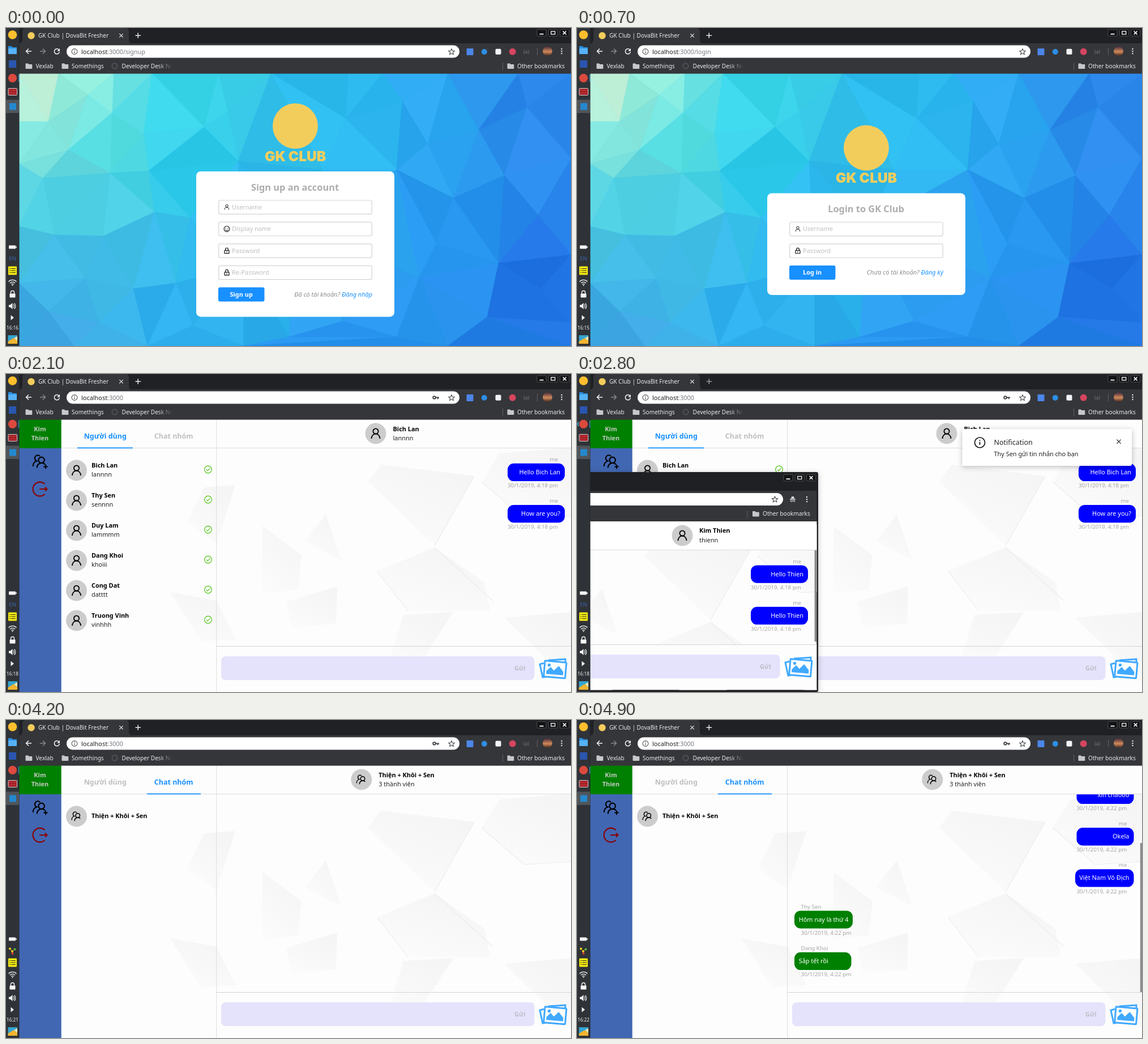
An HTML page that plays this animation: 998x561 px, repeating every 5600 ms.

```html
<!DOCTYPE html>
<html lang="vi">
<head>
<meta charset="utf-8">
<title>GK Club</title>
<style>
html, body { margin: 0; width: 100%; height: 100%; overflow: hidden; background: #202124; }
svg { display: block; width: 998px; height: 561px; font-family: "Noto Sans", "Open Sans", sans-serif; white-space: pre; }
.b { font-weight: 700; }
.i { font-style: italic; }
.m { text-anchor: middle; }
.e { text-anchor: end; }
.logo { font-family: Inter, sans-serif; font-weight: 900; }
.pop { filter: drop-shadow(0 2px 5px rgba(0,0,0,.25)); }
</style>
</head>
<body>
<svg id="stage" viewBox="0 0 998 561" xmlns="http://www.w3.org/2000/svg"></svg>
<script>
const STEP = 700, BODY = 10.92, UI = 10.15, SMALL = 9.82, HEAD = 12.48;
const BLUE = '#1890ff', BAR = '#35363a';

// Basic shapes; text takes its vertical centre
const text = (x, y, s, fill = '#000', cls = '', size = BODY) =>
  `<text x="${x}" y="${y + size * .36}" fill="${fill}" class="${cls}" font-size="${size}">${s}</text>`;
const rect = (x, y, w, h, fill, r = 0, more = '') =>
  `<rect x="${x}" y="${y}" width="${w}" height="${h}" rx="${r}" fill="${fill}" ${more}/>`;
const circle = (x, y, r, fill, more = '') => `<circle cx="${x}" cy="${y}" r="${r}" fill="${fill}" ${more}/>`;
const line = (d, stroke, w = 1, more = '') =>
  `<path d="${d}" fill="none" stroke="${stroke}" stroke-width="${w}" ${more}/>`;
const shape = (d, fill) => `<path d="${d}" fill="${fill}"/>`;
const at = (x, y, body, k = 1) => `<g transform="translate(${x} ${y}) scale(${k})">${body}</g>`;
const clip = (id, body) => `<g clip-path="url(#${id})">${body}</g>`;
const cross = (x, y, r, c, w = 1.2) => line(`M${x - r} ${y - r}l${2 * r} ${2 * r}m0 ${-2 * r}l${-2 * r} ${2 * r}`, c, w);

// Icons
const user = (x, y, k = 1) => at(x, y, line('M-7.5 9a7.5 8.5 0 0 1 15 0', '#000', 1.8) +
  circle(0, -4, 4.6, 'none', 'stroke="#000" stroke-width="1.8"'), k);
const users = (x, y, k = 1, plus = '') => at(x, y,
  line('M-11 8.5a8 8 0 0 1 6-9a5 5 0 1 1 5.500-8M-4.500 11a7.700 8 0 0 1 13.500-5.500', '#000', 2) +
  circle(3, -2, 5, 'none', 'stroke="#000" stroke-width="2"') + plus, k);
const lock = (x, y, k = 1, c = '#111') => at(x, y,
  rect(-4, -.5, 8, 5.3, 'none', .6, `stroke="${c}" stroke-width="1.2"`) +
  line('M-2.400 -.5v-2a2.400 2.400 0 0 1 4.800 0v2M0 1.200v2', c, 1.2), k);
const smile = (x, y) => at(x, y, circle(0, 0, 4.9, 'none', 'stroke="#111" stroke-width="1.1"') +
  circle(-1.9, -1.2, .7, '#111') + circle(1.9, -1.2, .7, '#111') + line('M-2.300 1a2.300 2 0 0 0 4.600 0', '#111', 1));
const folder = (x, y, c = '#c6c8ca') => shape(`M${x} ${y + 1}q0-1 1-1h3.500l1.300 1.500h5q1 0 1 1v6q0 1-1 1h-9.800q-1 0-1-1z`, c);
const star = (x, y) => line(`M${x} ${y - 5}l1.500 3.400 3.700.3-2.800 2.500.9 3.700-3.300-2-3.300 2 .9-3.700-2.800-2.500 3.700-.3z`, '#44474a', 1.1);
const dots = (x, y) => [-4, 0, 4].map(d => circle(x, y + d, 1.2, '#e8eaed')).join('');
const tick = y => circle(357, y, 6.3, '#fff', 'stroke="#52c41a" stroke-width="1.2"') + line(`M354 ${y}l2.300 2.300 4-4.600`, '#52c41a', 1.2);
const photos = (x, y) => at(x, y,
  line('M-16 -9l-7 2 5 23 5-1M-8 -14l30-2 0 5', '#40a9ff', 3) +
  `<g transform="rotate(5)">` + rect(-15, -12, 38, 28, '#fdfdfd', 1, 'stroke="#40a9ff" stroke-width="3"') +
  shape('M-11 11v-5l7-8 6 6 8-9 9 10v6z', '#40a9ff') + circle(-7, -5, 2.7, '#40a9ff') + '</g>');
const buttons = (x, y) => [0, 20.3, 40.6].map((d, i) => at(x + d, y,
  rect(-8, -5.7, 16, 11.4, '#111214', 1, 'stroke="#4c4f52"') +
  [line('M-3.500 2.200h7', '#fff', 1.8), rect(-3.5, -2.5, 7, 5, 'none', 0, 'stroke="#fff" stroke-width="1.3"'), cross(0, 0, 2.9, '#fff', 1.5)][i])).join('');

// Low-poly backdrop: Delaunay mesh over a few points, tinted from nearby swatches
const mesh = [23,80, 93,80, 190,80, 258,80, 375,80, 468,80, 605,80, 665,80, 780,80, 905,80, 998,80,
  23,165, 75,165, 145,118, 187,150, 243,187, 350,175, 392,148, 600,160, 700,130, 745,205, 835,180, 920,140,
  23,240, 65,265, 110,215, 184,256, 252,252, 325,335, 410,235, 560,250, 690,250, 790,300, 880,260, 998,230,
  23,350, 85,365, 172,367, 262,325, 510,350, 420,420, 760,380, 940,330, 998,400, 870,415, 730,440,
  23,450, 75,500, 140,442, 225,460, 165,520, 300,450, 945,460, 850,510, 998,520,
  23,561, 120,561, 250,561, 330,525, 420,561, 500,545, 595,517, 690,545, 780,561, 998,561];
const swatches = [[35, 95, 'd2f7dc'], [120, 110, '94eedd'], [60, 200, '82e6df'], [190, 200, '54dee2'], [90, 310, '4dcfe2'],
  [310, 130, '38d4e8'], [320, 250, '2dcbec'], [130, 440, '3fb9e6'], [420, 380, '2bb7ee'], [90, 530, '40a9e6'], [300, 510, '2daeee'],
  [600, 160, '2dbdf0'], [750, 150, '2ba6f0'], [930, 130, '2b86ea'], [760, 380, '2797f0'], [600, 535, '2793ee'], [940, 440, '2173e4']];
function tint(x, y, n) {
  let sum = 0, c = [0, 0, 0];
  for (const [sx, sy, hex] of swatches) {
    const w = 1 / (1 + Math.hypot(x - sx, y - sy)) ** 3;
    sum += w;
    c = c.map((v, k) => v + w * parseInt(hex.substr(k * 2, 2), 16));
  }
  const shift = (n * 37 % 11 - 5) * 1.3;
  return `rgb(${c.map(v => Math.round(Math.min(255, v / sum + shift)))})`;
}
function backdrop() {
  const p = [];
  for (let k = 0; k < mesh.length; k += 2) p.push([mesh[k], mesh[k + 1]]);
  let out = rect(23, 80, 975, 481, '#2badee'), n = 0;
  for (let i = 0; i < p.length; i++) for (let j = i + 1; j < p.length; j++) for (let k = j + 1; k < p.length; k++) {
    const [a, b] = p[i], [c, d] = p[j], [e, f] = p[k];
    const area = 2 * (a * (d - f) + c * (f - b) + e * (b - d));
    if (Math.abs(area) < 1) continue;
    const A = a * a + b * b, C = c * c + d * d, E = e * e + f * f;
    const x = (A * (d - f) + C * (f - b) + E * (b - d)) / area;
    const y = (A * (e - c) + C * (a - e) + E * (c - a)) / area;
    const r = Math.hypot(a - x, b - y) - 1e-6;
    if (p.some(q => Math.hypot(q[0] - x, q[1] - y) < r)) continue;
    const col = tint((a + c + e) / 3, (b + d + f) / 3, n++);
    out += `<path d="M${a} ${b}L${c} ${d}L${e} ${f}z" fill="${col}" stroke="${col}" stroke-width=".7"/>`;
  }
  return out;
}

const facets = ['M640 190L662 160 827 180 757 303z', 'M840 190L872 140 998 130V250L915 255z', 'M655 348L757 306 845 368 855 418H710z',
  'M453 268L522 320 515 380 452 388z', 'M528 295L565 248 592 328z', 'M495 402L585 375 583 440 505 448z',
  'M350 200L405 196 372 300 320 262z', 'M702 425L790 420 735 505 672 525z', 'M880 430L998 420V545z', 'M290 385L372 400 405 468 345 472z']
  .map(d => `<path d="${d}" fill="url(#facet)"/>`).join('') +
  line('M655 348L710 418M757 303L827 180M840 190L915 255L998 250M757 306L860 400', '#ececec', 1.2);

// Sign-up and login forms
const rows = { Username: (x, y) => user(x, y, .5), 'Display name': smile, Password: lock, 'Re-Password': lock };
function form(top, title, names, label, ask, link) {
  const y = i => top + 63 + 38.45 * i, end = y(names.length);
  return '<use href="#poly"/>' + circle(511, top - 80, 40, '#f3cd5c') +
    text(511, top - 27, 'GK CLUB', '#f3cd5c', 'logo m', 24.5) +
    rect(336, top, 350, end - top + 39.6, '#fff', 8) +
    text(510.5, top + 28, title, '#adadad', 'b m', 16.38) +
    names.map((s, i) => rect(375.7, y(i) - 12, 270.6, 24.3, '#fff', 3, 'stroke="#d4d4d4" stroke-width="1.2"') +
      rows[s](390, y(i)) + text(399, y(i), s, '#bfbfbf')).join('') +
    rect(375, end - 12.4, 81.5, 25, BLUE, 3) + text(415.7, end, label, '#fff', 'b m') +
    text(647, end, `${ask} <tspan fill="${BLUE}">${link}</tspan>`, '#8c8c8c', 'i e');
}

// Chat page
const people = [['Bich Lan', 'lannnn'], ['Thy Sen', 'sennnn'], ['Duy Lam', 'lammmm'], ['Dang Khoi', 'khoiii'], ['Cong Dat', 'datttt'], ['Truong Vinh', 'vinhhh']];
const group = 'Thiện + Khôi + Sen';
const avatar = (x, y, icon = user) => circle(x, y, 18.5, '#ccc') + icon(x, y, icon === users ? .75 : 1);

function side(tab) {
  const [u, g] = tab ? ['#bfbfbf', BLUE] : [BLUE, '#bfbfbf'];
  const list = tab ? avatar(124.5, 170, users) + text(151, 169.5, group, '#000', 'b')
    : people.map(([name, id], i) => at(0, 53 * i, avatar(124.5, 170) + text(151, 161.5, name, '#000', 'b') +
      text(151, 177.5, id, '#222') + tick(168.5))).join('');
  return rect(23, 80, 975, 481, '#fdfdfd') + facets + rect(23, 80, 74.7, 51, '#008000') +
    text(60, 97, 'Kim', '#c4c9c4', 'b m') + text(60, 113, 'Thien', '#c4c9c4', 'b m') + rect(23, 131, 74.7, 430, '#4267b2') +
    users(59.5, 154, 1.05, line('M6.500 9h7M10 5.500v7', '#000', 1.8)) +
    at(60, 203, line('M8.500 -9a12.400 12.400 0 1 0 0 18M-1 0h13M9 -3.500l3.500 3.500-3.500 3.500', '#8b0000', 2.1)) +
    text(175.3, 110, 'Người dùng', u, 'b m', HEAD) + text(296.2, 110, 'Chat nhóm', g, 'b m', HEAD) +
    line('M98 130.700H371.500M371.700 80V561', '#dcdcdc') +
    (tab ? rect(249, 129.5, 95, 1.8, BLUE) : rect(126, 129.5, 98, 1.8, BLUE)) + list;
}
const header = (x, name, sub, icon) => avatar(x, 105, icon) + text(x + 30.5, 97, name, '#000', 'b') +
  text(x + 30.5, 113, sub, '#222') + line('M372 130.700H998', '#dcdcdc');
const footer = line('M372 480.500H998', '#d4d4d4') + rect(380, 498, 553.5, 42, '#e5e3fb', 8) +
  text(898, 519, 'Gửi', '#bdbdc6', 'b') + photos(966, 519);

// y is the centre of the sender label; mine are set against the right edge
function mine(y, s, when, right = 987, w = 101) {
  return text(right - 12, y, 'me', '#a3a3a3', 'e', SMALL) + rect(right - w, y + 7.4, w, 31.4, '#00f', 11) +
    text(right - 8, y + 22.6, s, '#fff', 'e') + stamp(right - 12, y, when, 'e');
}
function theirs(y, who, s, when, w = 100.5) {
  return text(395.5, y, who, '#a3a3a3', '', SMALL) + rect(384, y + 7.4, w, 31.4, '#008000', 11) +
    text(391.700, y + 22.6, s, '#fff') + stamp(395.5, y, when, '');
}
const stamp = (x, y, when, cls) => text(x, y + 46.3, `30/1/2019, ${when} pm`, '#a3a3a3', cls, SMALL);

const privateChat = side(0) + header(653, ...people[0]) + mine(150.3, 'Hello Bich Lan', '4:18') + mine(223.5, 'How are you?', '4:18') + footer;

const notice = rect(680.5, 97, 299.5, 65, '#fff', 3, 'class="pop"') + circle(711.5, 121, 9, 'none', 'stroke="#111" stroke-width="1.7"') +
  line('M711.500 119.500v5.500M711.500 116v1.800', '#111', 1.7) + text(736.5, 121, 'Notification', '#262626', '', HEAD) +
  text(736.5, 141, 'Thy Sen gửi tin nhắn cho bạn', '#222') + cross(957, 119.300, 3.600, '#222');

const secondWindow = rect(10, 173, 416, 388, '#1e2023', 3, 'class="pop"') + clip('inner',
  rect(23, 206, 400.5, 54, BAR) + rect(-50, 210, 414, 22, '#fff', 11) + star(349.5, 221) +
  at(381, 221, shape('M-5 -1h10v1.200h-10zM-2.800-1.500l.8-3.300h4l.8 3.300z', '#e8eaed') +
    circle(-2.3, 2.7, 1.6, 'none', 'stroke="#e8eaed"') + circle(2.3, 2.7, 1.6, 'none', 'stroke="#e8eaed"')) + dots(406, 221) +
  line('M301 241v13', '#5f6368') + folder(310, 242) + text(328, 246.5, 'Other bookmarks', '#e8eaed', '', UI) +
  rect(23, 260, 400.5, 297.5, '#fdfdfd') + at(-521, 131, facets) + rect(23, 260, 400.5, 50, '#fff') +
  avatar(186, 285) + text(216, 276.5, 'Kim Thien', '#000', 'b') + text(216, 293, 'thienn', '#222') + line('M23 310.500H423', '#dcdcdc') +
  mine(330, 'Hello Thien', '4:18', 408) + mine(403.300, 'Hello Thien', '4:18', 408) + rect(419.6, 311, 3.8, 161, '#8b8b8b') +
  rect(23, 477, 400.5, 80, '#fdfdfd') + at(-575, -3, footer)) + buttons(373, 183);

const box = (x, y, name, on) => rect(x + .5, y - 6, 12, 12, on ? BLUE : '#fff', 1.5, `stroke="${on ? BLUE : '#d4d4d4'}"`) +
  (on ? line(`M${x + 3.500} ${y}l2.300 2.500 4-4.800`, '#fff', 1.5) : '') + text(x + 18.5, y, name, '#222');
const dialog = rect(23, 80, 975, 481, 'rgba(0,0,0,.65)') + rect(308.5, 96, 405, 191, '#fff', 3, 'class="pop"') +
  text(326.5, 117, 'Tạo nhóm', '#333', '', HEAD) + cross(691.7, 117.5, 4, '#111', 1.5) + line('M308.500 138.500h405M308.500 246.500h405', '#e4e4e4') +
  rect(327, 158.3, 367.4, 24, '#fff', 3, 'stroke="#d0d0d0" stroke-width="1.2"') + text(336, 170, group, '#595959') +
  [[327, 202.5], [408, 202.5, 1], [478.5, 202.5], [557, 202.5, 1], [327, 218.7], [405.700, 218.7]]
    .map(([x, y, on], i) => box(x, y, people[i][0], on)).join('') +
  rect(596, 254.7, 58, 24.4, '#fff', 3, 'stroke="#d0d0d0"') + text(625, 266.7, 'Cancel', '#222', 'm') +
  rect(660.5, 254.3, 41, 25, BLUE, 3) + text(681, 266.7, 'OK', '#111', 'm');

const groupChat = side(1) + header(627.8, group, '3 thành viên', users) + footer;
const talk = clip('log', mine(109.3, 'xin chaooo', '4:22', 983.5) + mine(182.6, 'Okela', '4:22', 983.5) +
  mine(255.8, 'Việt Nam Vô Địch', '4:22', 983.5, 103.5) + theirs(329, 'Thy Sen', 'Hôm nay là thứ 4', '4:22', 103) +
  theirs(402.3, 'Dang Khoi', 'Sắp tết rồi', '4:22') + rect(994.8, 217, 3.2, 263, '#8b8b8b'));

const scenes = [
  { clock: '16:16', path: '/signup', body: form(253, 'Sign up an account', Object.keys(rows), 'Sign up', 'Đã có tài khoản?', 'Đăng nhập') },
  { clock: '16:15', path: '/login', body: form(291.5, 'Login to GK Club', ['Username', 'Password'], 'Log in', 'Chưa có tài khoản?', 'Đăng ký') },
  { clock: '16:17', body: side(0) },
  { clock: '16:18', body: privateChat },
  { clock: '16:18', body: privateChat + notice + secondWindow, two: true },
  { clock: '16:20', body: side(0) + header(659, ...people[1]) + theirs(296.5, 'Thy Sen', 'Hello Thien', '4:19') +
    mine(369.8, 'Hello Sen', '4:19') + footer + dialog, two: true, tray: true },
  { clock: '16:21', body: groupChat, tray: true },
  { clock: '16:22', body: groupChat + talk, tray: true }
];

// Browser frame
const browser = rect(23, 0, 975, 28, '#202124') + rect(23, 27, 975, 53.6, BAR) +
  shape('M23 27q6 0 6-6V6q0-6 6-6h176q6 0 6 6v15q0 6 6 6z', BAR) + circle(44.5, 13.5, 6.2, '#f3cd5c') +
  text(57, 13.5, 'GK Club | DovaBit Fresher', '#e8eaed', '', UI) + cross(203.500, 13.3, 3.2, '#dadce0') +
  `<g id="plus">${line('M228.500 13.300h9.500M233.200 8.600v9.500', '#e8eaed', 1.5)}</g>` + buttons(946, 8.5) +
  line('M45 41H36M40 36.500l-4.500 4.500 4.500 4.500', '#f1f3f4', 1.5) + line('M60 41h9M65 36.500l4.500 4.500-4.500 4.500', '#85888c', 1.5) +
  line('M93.500 38.300a4.600 4.600 0 1 0 1 3.700', '#f1f3f4', 1.5) + shape('M95 36v4.800h-4.800z', '#f1f3f4') +
  rect(107, 30.5, 694, 22, '#fff', 11) + circle(121, 41.5, 4.9, 'none', 'stroke="#555" stroke-width="1.1"') +
  line('M121 41v3.300M121 38.600v1.300', '#555', 1.2) + `<text x="133" y="45.500" font-size="${BODY}" fill="#202124">localhost<tspan id="path" fill="#777b80"></tspan></text>` +
  `<g id="key">${circle(756.5, 41.5, 2.3, 'none', 'stroke="#44474a" stroke-width="1.9"') + line('M759 41.500h6M762.700 41.500v2.700', '#44474a', 1.9)}</g>` +
  star(787, 41.7) + rect(813.5, 36, 12, 12, '#4c86e8', 1) + circle(844.8, 42, 5, '#2d8ee6') + rect(864.5, 36.7, 10, 10, '#f1f3f4', 2) +
  circle(894.7, 41.7, 6, '#d6455f') + text(919, 41.5, '(a)', '#777b80', 'm', 8.5) + line('M938.500 35v13', '#5f6368') +
  circle(956.500, 41, 8.4, 'url(#photo)') + dots(981.5, 41) +
  folder(34.5, 62.5) + text(52.5, 67, 'Vexlab', '#e8eaed', '', UI) + folder(98.5, 62.5) + text(116, 67, 'Somethings', '#e8eaed', '', UI) +
  circle(192, 67, 4.7, 'none', 'stroke="#5a5d61" stroke-width="2" stroke-dasharray="2 1"') + clip('mark', text(204.5, 67, 'Developer Desk Notes', 'url(#fade)', '', UI)) +
  line('M877.500 61v13', '#5f6368') + folder(885.5, 62.5) + text(903, 67, 'Other bookmarks', '#e8eaed', '', UI);

// Desktop panel
const panel = rect(0, 0, 23.3, 561, '#2f3337') + line('M22.900 0V561', '#25282b', .8) + rect(0, 126.5, 23, 23.500, '#50555a') +
  circle(11.5, 12, 7.8, '#fdbf2d') + shape('M4 32h6l1.500 2H19v12H4z', '#2b8fe0') + rect(4, 36, 15, 10, '#55b2f6', 1) +
  rect(5, 57, 13, 13, '#2a56b0') + circle(11.5, 88.3, 7.6, '#dc4a3d') +
  rect(4, 106.5, 15.5, 12, '#a31f24', 1, 'stroke="#d8d8d8"') + line('M6 110h11M6 114.500h11', '#e0525a', 1.2, 'stroke-dasharray="2 1"') +
  rect(6, 132.5, 12, 12, '#2488ce') + line('M22.700 82V95', '#49a7e4', 1) +
  `<g id="two">${line('M3 84.500l-2 3.800 2 3.800', '#3daee9', 1.6)}</g>` +
  rect(5, 383.5, 12, 6, '#f4f4f4', 1) + rect(17.3, 385, 1.5, 3, '#f4f4f4') +
  `<g id="lang">${text(11.5, 407, 'EN', '#3a66ae', 'm', 9.5)}</g>` +
  `<g id="tray">${line('M7 403.500l4 4.500 5-4M11 408v4', '#a8a23a', 1) + circle(7, 403.5, 2, '#f4d11e') + circle(15.5, 404.5, 2, '#5dbb46') +
    circle(11, 408, 2, '#f4d11e') + circle(11.5, 412, 2, '#dc3b35')}</g>` +
  rect(4, 420.5, 15, 15, '#f7ec13', 1) + line('M6 424.500h2M9 424.500h8M6 428h2M9 428h8M6 431.500h2M9 431.500h8', '#2b2b1a', 1.2) +
  line('M4.500 447.500a9.500 9.500 0 0 1 14 0M7 450a6.300 6.300 0 0 1 9 0M9.300 452.300a3 3 0 0 1 4.400 0', '#f4f4f4', 1.3) + circle(11.5, 454, 1, '#f4f4f4') +
  rect(6.5, 468.500, 10, 7, '#f4f4f4', .8) + line('M8.500 469v-2.500a3 3 0 0 1 6 0v2.500', '#f4f4f4', 1.4) +
  shape('M5 488.500h2.500l4-3.500v11l-4-3.500H5z', '#f4f4f4') + line('M13 487.500a4 4 0 0 1 0 6M14.500 485.500a6.500 6.500 0 0 1 0 10', '#f4f4f4', 1.2) +
  shape('M8.500 506.500l5.500 4.500-5.500 4.500z', '#f4f4f4') +
  `<text id="clock" x="11.500" y="532.300" class="m" font-size="8.300" fill="#f4f4f4"></text>` +
  rect(3.5, 542, 16.5, 15, '#35a4cf') + shape('M3.500 557V553l10-6 6.500 5v5z', '#f3b52f') + shape('M14 547l6-3v8z', '#efe6b7');

const area = (id, x, y, w, h) => `<clipPath id="${id}">${rect(x, y, w, h, '#000')}</clipPath>`;
const stop = (o, c) => `<stop offset="${o}" stop-color="${c}"/>`;
const stage = document.getElementById('stage');
stage.innerHTML = '<defs>' + area('inner', 23, 206, 400.5, 351.5) + area('log', 372, 131.3, 626, 349) + area('mark', 200, 58, 93, 20) +
  `<linearGradient id="facet" x1="0" y1="1" x2=".6" y2="0">${stop(0, '#fcfcfc') + stop(1, '#f5f5f5')}</linearGradient>` +
  `<linearGradient id="photo" x1="0" y1="0" x2="0" y2="1">${stop(0, '#4a2c3a') + stop(.55, '#d28a5a') + stop(1, '#3a2420')}</linearGradient>` +
  `<linearGradient id="fade" gradientUnits="userSpaceOnUse" x1="268" y1="0" x2="294" y2="0">${stop(0, '#e8eaed') + stop(1, BAR)}</linearGradient>` +
  `<g id="poly">${backdrop()}</g></defs>` +
  scenes.map(s => `<g class="scene">${s.body}</g>`).join('') + browser + panel;

const $ = id => document.getElementById(id);
const pages = stage.querySelectorAll('.scene');
const show = (el, on) => el.setAttribute('display', on ? 'inline' : 'none');
let current = -1;

function draw(ms) {
  const n = Math.floor(ms / STEP) % scenes.length;
  if (n === current) return;
  current = n;
  const s = scenes[n];
  pages.forEach((p, i) => show(p, i === n));
  $('path').textContent = ':3000' + (s.path || '');
  $('clock').textContent = s.clock;
  show($('key'), !s.path);
  show($('two'), s.two);
  show($('tray'), s.tray);
  show($('lang'), !s.tray);
  $('plus').setAttribute('opacity', n === 4 ? .6 : 1);
}

const start = performance.now();
function tickFrame() {
  draw(performance.now() - start);
  requestAnimationFrame(tickFrame);
}
tickFrame();
</script>
</body>
</html>
```
